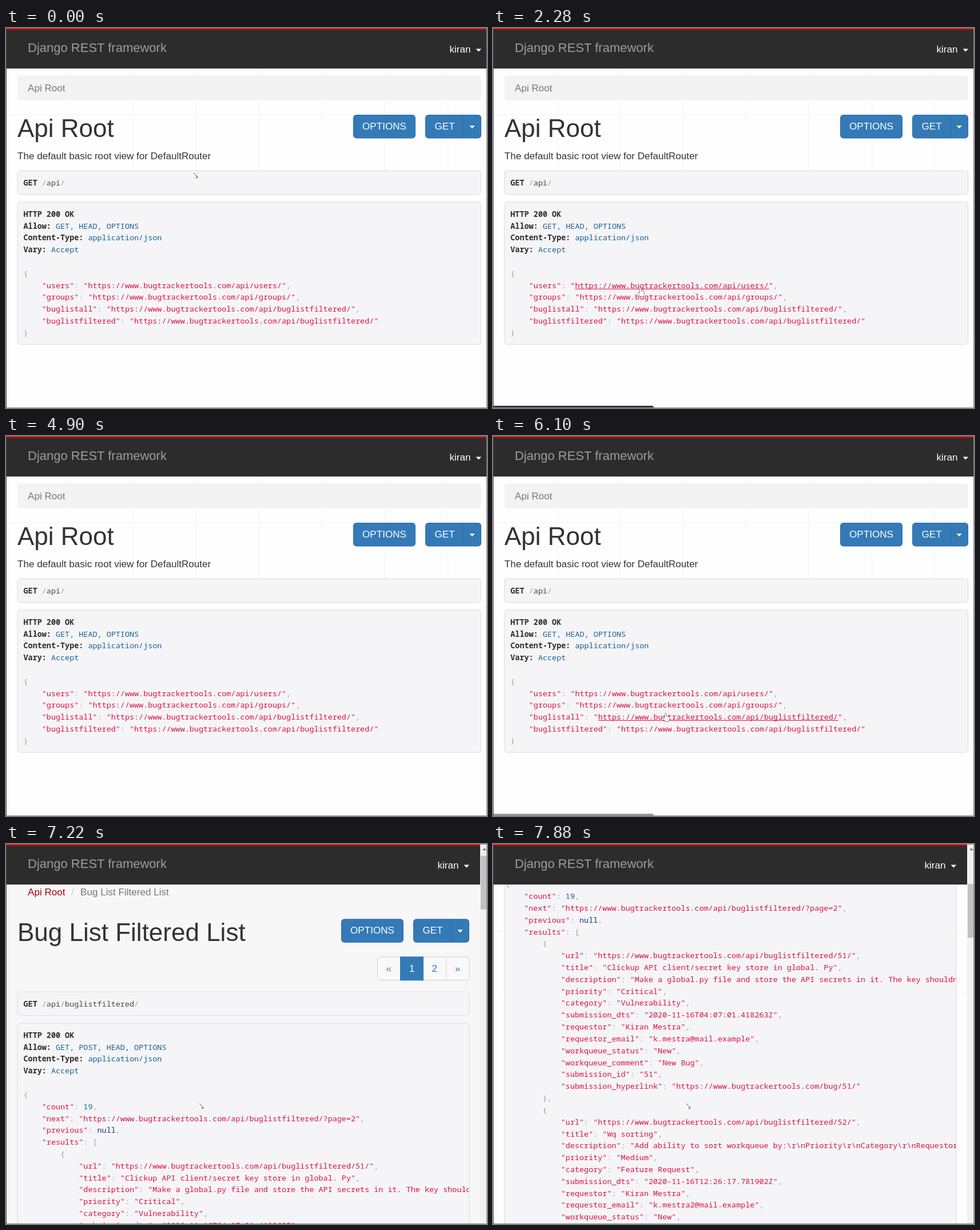
These frames come from a looping animation (841 px wide and 666 px high, 8000 ms). An HTML page:

```html
<!DOCTYPE html>
<html lang="en">
<head>
<meta charset="utf-8">
<title>Api Root</title>
<style>
html, body { margin: 0; height: 100%; overflow: hidden; background: #fefefe; }
svg { display: block; font-family: "Liberation Sans", Arial, sans-serif; }
.code { font: 13.45px "Noto Sans Mono", monospace; white-space: pre; fill: #93a1a1; }
.bold { font-weight: bold; fill: #2c2c2c; }
</style>
</head>
<body>
<svg id="stage" width="841" height="666" viewBox="0 0 841 666"></svg>
<script>
const LOOP = 8000, LINE = 20.82, CHAR = 8.07, CODE_X = 30.5;
const RED = '#dd1144', BLUE = '#195f91', NAVY = '#1e347b', BUTTON = '#337ab7';
const HOST = 'https://www.bugtrackertools.com/';

const rect = (x, y, w, h, fill, more = '') =>
  `<rect x="${x}" y="${y}" width="${w}" height="${h}" fill="${fill}" ${more}/>`;
const text = (x, y, string, fill = '#333', size = 17.1, more = '') =>
  `<text x="${x}" y="${y}" fill="${fill}" font-size="${size}" ${more}>${string}</text>`;
const span = (string, fill) => `<tspan fill="${fill}">${string}</tspan>`;
const bold = string => `<tspan class="bold">${string}</tspan>`;
const code = (y, content) =>
  `<text class="code" xml:space="preserve" x="${CODE_X}" y="${y}">${content}</text>`;
const caret = (x, y) => `<path d="M${x} ${y}h9.6l-4.8 5z" fill="#fff"/>`;
const panel = (y, w, h) =>
  rect(20, y, w, h, '#f5f5f7', 'rx="5" stroke="#dcdce1"');

const header = line => {
  const parts = line.match(/^([\w-]+:)(.*)$/);
  return parts ? bold(parts[1]) + span(parts[2], BLUE) : bold(line);
};
const json = line => line.replace(/"[^"]*"|null|\d+/g, token =>
  span(token, token[0] === '"' ? RED : token === 'null' ? NAVY : BLUE));

const rootJson = `{
    "users": "${HOST}api/users/",
    "groups": "${HOST}api/groups/",
    "buglistall": "${HOST}api/buglistfiltered/",
    "buglistfiltered": "${HOST}api/buglistfiltered/"
}`;
const usersJson = `{
    "count": 9,
    "next": null,
    "previous": null,
    "results": [
        {
            "url": "${HOST}api/users/9/",
            "username": "TobenMarris",
            "email": "",
            "groups": []
        },
        {`;
const bug = (id, title, description, priority, category, time, email) => `        {
            "url": "${HOST}api/buglistfiltered/${id}/",
            "title": "${title}",
            "description": "${description}",
            "priority": "${priority}",
            "category": "${category}",
            "submission_dts": "${time}",
            "requestor": "Kiran Mestra",
            "requestor_email": "${email}",
            "workqueue_status": "New",
            "workqueue_comment": "New Bug",
            "submission_id": "${id}",
            "submission_hyperlink": "${HOST}bug/${id}/"
        },
`;
const bugsJson = `{
    "count": 19,
    "next": "${HOST}api/buglistfiltered/?page=2",
    "previous": null,
    "results": [
` + bug(51, 'Clickup API client/secret key store in global. Py',
    "Make a global.py file and store the API secrets in it. The key shouldn't be shared",
    'Critical', 'Vulnerability', '2020-11-16T04:07:01.418263Z', 'k.mestra@mail.example')
  + bug(52, 'Wq sorting',
    'Add ability to sort workqueue by:\\r\\nPriority\\r\\nCategory\\r\\nRequestor\\r\\nStatus',
    'Medium', 'Feature Request', '2020-11-16T12:26:17.781902Z', 'k.mestra2@mail.example');

const buttons = dx => {
  const box = 'rx="5" stroke="#2e6da4"';
  return `<g transform="translate(${dx})">`
    + rect(607.5, 152.5, 108, 40.5, BUTTON, box) + text(623, 178, 'OPTIONS', '#fff')
    + rect(733.5, 152.5, 97, 40.5, BUTTON, box) + text(749.5, 178, 'GET', '#fff')
    + rect(799, 153, 1, 40, '#2e6da4') + caret(810.3, 171) + '</g>';
};

const pagination = () => {
  const cells = [['«', 664.5, '#777'], ['1', 705, '#fff'], ['2', 744.5, BUTTON], ['»', 785, BUTTON]];
  return rect(649.5, 218.5, 160.5, 41, '#f9f9fa', 'rx="5" stroke="#ccc"')
    + rect(689, 218, 41, 42, BUTTON) + rect(769, 219, 1, 40, '#ddd')
    + cells.map(([label, x, fill]) => text(x, 244.5, label, fill)).join('');
};

function page(id, { title, blurb = '', path, allow, body, drop = 0, root = false }) {
  const width = root ? 810.5 : 790;
  const lines = ['HTTP 200 OK', `Allow: ${allow}`, 'Content-Type: application/json', 'Vary: Accept']
    .map(header).concat('', body.split('\n').map(json));
  const crumbs = root ? text(38, 111, title, '#777')
    : text(38, 111, 'Api Root', '#a30000') + text(114, 111, '/', '#ccc') + text(130, 111, title, '#777');
  return `<g id="${id}">${crumbs}${text(20, 191, title, '#333', 44)}${text(20, 230, blurb)}`
    + buttons(root ? 0 : -21) + (drop ? pagination() : '')
    + panel(250 + drop, width, 41.5)
    + code(275.8 + drop, bold('GET') + ' ' + path.replace(/\w+/g, word => span(word, '#48484c')))
    + panel(305 + drop, width, root ? 249.5 : 2000)
    + `<g clip-path="url(#pre)"><g class="lines">`
    + lines.map((line, i) => code(330.7 + drop + i * LINE, line)).join('')
    + '</g></g></g>';
}

const grid = [112, 222, 332, 442, 552, 662, 772].map(x => rect(x, 71, 1, 223, '#f3f3f3')).join('')
  + [152, 262].map(y => rect(1, y, 840, 1, '#f3f3f3')).join('');

stage.innerHTML = `<clipPath id="pre"><rect x="21" y="300" width="788.5" height="2000"/></clipPath>`
  + rect(0, 0, 841, 666, '#fefefe') + grid
  + rect(20, 83, 811, 44, '#f3f3f3', 'rx="5" id="crumbBar"')
  + '<path id="flat" fill="#f7f7f8"/>'
  + page('root', { title: 'Api Root', blurb: 'The default basic root view for DefaultRouter',
      path: '/api/', allow: 'GET, HEAD, OPTIONS', body: rootJson, root: true })
  + page('users', { title: 'User List', blurb: 'API endpoint that allows users to be viewed or edited.',
      path: '/api/users/', allow: 'GET, POST, HEAD, OPTIONS', body: usersJson })
  + page('bugs', { title: 'Bug List Filtered List', path: '/api/buglistfiltered/',
      allow: 'GET, POST, HEAD, OPTIONS', body: bugsJson, drop: 29.8 })
  + rect(0, 0, 841, 71, '#2c2c2c') + rect(0, 1, 841, 3, '#a30000')
  + text(38, 41.5, 'Django REST framework', '#9d9d9d', 22)
  + `<g id="account">${text(775.5, 43, 'kiran', '#fff')}${caret(821.5, 36.5)}</g>`
  + `<g id="scrollbar">${rect(829, 0, 12, 666, '#f1f1f1')}<path d="M833 11l3.5-4 3.5 4z" fill="#777"/>`
  + rect(830, 18, 11, 182, '#c1c1c1', 'id="thumb"') + '</g>'
  + `<path id="underline" stroke="${RED}"/>`
  + '<path id="hand" fill="#fff" stroke="#777" stroke-width=".8" d="M-1.5 1.2a1.5 1.5 0 0 1 3 0V5l5 1.5V10L5 14.5H-1L-4 9.5l-.5-2 1.5-.5 1.5 1.5z"/>'
  + '<path id="arrow" fill="none" stroke="#555" d="M0 0L7.5 7.5H4.5L5 10"/>'
  + '<path id="status" d="M0 662h278q3 0 3 4H0z"/>'
  + rect(0, 0, 841, 1, '#8a8a8a') + rect(0, 665, 841, 1, '#8a8a8a')
  + rect(840, 0, 1, 666, '#8a8a8a') + rect(0, 0, 1, 666, '#4a4a4a');

// Each row starts at its time and holds until the next one.
const PAGES = [[0, 'root'], [3060, 'users'], [4900, 'root'], [6830, 'bugs']];
// time, pointer x, y, shape, hovered line of the root JSON
const POINTER = [
  [0, 328, 254, 'arrow'], [120, 318, 243, 'arrow'], [250, 308, 232, 'arrow'],
  [400, 250, 487, 'hand', 3], [520, 255, 478, 'arrow'],
  [770, 257, 468, 'hand', 2], [890, 258, 455, 'hand', 1], [1010, 260, 449, 'hand', 1],
  [1130, 261, 444, 'hand', 1], [1250, 262, 439, 'arrow'],
  [1800, 261, 444, 'hand', 1], [1920, 260, 449, 'hand', 1], [2040, 258, 456, 'hand', 1],
  [3060], [5150, 42, 28, 'arrow'], [5270, 292, 423, 'arrow'],
  [5420, 296, 447, 'hand', 1], [5550, 298, 469, 'hand', 2], [5700, 299, 480, 'arrow'],
  [5820, 300, 484, 'hand', 3], [5950, 302, 486, 'hand', 3],
  [6400, 302, 486, 'arrow', 3], [6680, 306, 469, 'arrow', 3], [6830, 338, 455, 'arrow']
];
const STATUS = [[0, 'none'], [2160, '#999'], [2280, '#3a3a3a'], [3320, 'none'],
  [6100, '#999'], [6250, '#3a3a3a'], [7090, 'none']];
const FLAT = [[0, ''], [3060, 'M20 71H829V200H20z'], [3460, 'M20 71H829V200H282V127H20z'],
  [3610, 'M20 71H39V127H20zM282 71H829V200H282z'], [4900, ''],
  [6830, 'M1 71H829V665H1z'], [7370, '']];
// time, page scroll, sideways scroll of the code
const SCROLL = [[0, 0, 0], [7090, 5, 0], [7220, 20.7, 0], [7370, 120, 0],
  [7610, 250, 8.5], [7750, 340, 8.5], [7880, 389.3, 8.5]];

const at = (rows, time) => rows.findLast(row => row[0] <= time).slice(1);
const $ = id => document.getElementById(id);
const set = (id, name, value) => $(id).setAttribute(name, value);
const show = (id, on) => set(id, 'display', on ? 'inline' : 'none');

function render(time) {
  const [current] = at(PAGES, time), isRoot = current === 'root';
  for (const id of ['root', 'users', 'bugs']) show(id, id === current);
  show('scrollbar', !isRoot);
  show('crumbBar', current !== 'bugs');
  set('crumbBar', 'width', isRoot ? 811 : 790);
  set('account', 'transform', `translate(${isRoot ? 0 : -21})`);
  set('flat', 'd', at(FLAT, time)[0]);
  set('status', 'fill', at(STATUS, time)[0]);

  const [down, side] = at(SCROLL, time);
  set('bugs', 'transform', `translate(0 ${-down})`);
  $('bugs').querySelector('.lines').setAttribute('transform', `translate(${-side})`);
  set('thumb', 'y', 18 + down * 0.134);
  set('thumb', 'height', current === 'bugs' ? 94 : 182);

  const [x, y, shape, hover] = at(POINTER, time);
  for (const id of ['hand', 'arrow']) {
    show(id, id === shape);
    if (id === shape) set(id, 'transform', `translate(${x} ${y})`);
  }
  show('underline', hover);
  if (hover) {
    const line = rootJson.split('\n')[hover], url = line.match(/https[^"]+/);
    const start = CODE_X + url.index * CHAR;
    set('underline', 'd', `M${start} ${Math.round(353 + hover * LINE) + 83.5}h${url[0].length * CHAR}`);
  }
}

function tick() {
  render(performance.now() % LOOP);
  requestAnimationFrame(tick);
}
tick();
</script>
</body>
</html>
```
